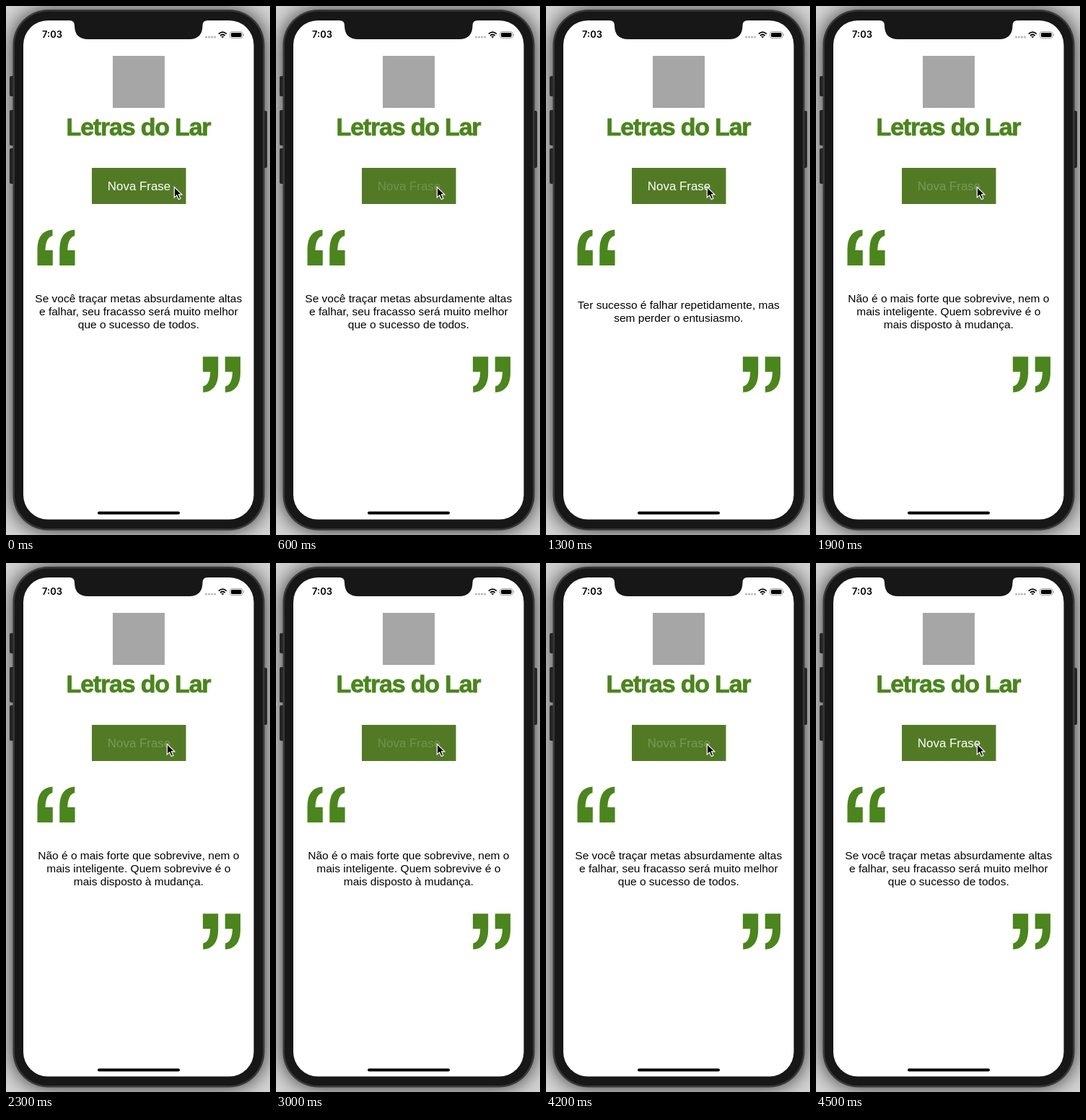
Write an HTML page that moves like this. It is 366 by 732 pixels and loops after 4.7 s.

```html
<!DOCTYPE html>
<html lang="pt">
<head>
<meta charset="utf-8">
<style>
html, body { margin: 0; width: 100%; height: 100%; overflow: hidden; background: #d4d4d4; }
svg { display: block; width: 366px; height: 732px; }
text { font-family: "Liberation Sans", Arial, sans-serif; text-anchor: middle; }
.title { font-size: 34px; font-weight: bold; letter-spacing: -1.2px; fill: #4a861b; stroke: #4a861b; stroke-width: .8px; }
.clock { font: 600 13px Inter, sans-serif; }
#label { font-size: 16.9px; fill: #fff; }
#quote { font-size: 15.5px; }
</style>
</head>
<body>
<svg viewBox="0 0 366 732">
  <defs>
    <filter id="soft" x="-20%" y="-20%" width="140%" height="140%"><feGaussianBlur stdDeviation="14"/></filter>
    <path id="mark" d="M43.5 359V336Q44 311 64.5 309.5V318Q55 320 54.5 338H64.8V359Z"/>
    <g id="marks" fill="#4a861b"><use href="#mark"/><use href="#mark" x="30.8"/></g>
  </defs>

  <rect width="366" height="732" fill="#d4d4d4"/>
  <rect x="10" y="6" width="348" height="719" rx="48" opacity=".8" filter="url(#soft)"/>

  <!-- phone -->
  <g fill="#242424">
    <rect x="5" y="97" width="8" height="28" rx="2"/>
    <rect x="5" y="144" width="8" height="49" rx="2"/>
    <rect x="5" y="197" width="8" height="49" rx="2"/>
    <rect x="354" y="145" width="8" height="79" rx="2"/>
  </g>
  <rect x="9.5" y="5" width="349" height="720.5" rx="49" fill="#383838"/>
  <rect x="12" y="7.5" width="344" height="715.5" rx="46.5" fill="#171717"/>
  <rect x="24" y="20" width="319.5" height="690.5" rx="34" fill="#fff"/>
  <path fill="#171717" d="M88 19V20Q95 20 95 27Q95 46 114 46H253.5Q272.5 46 272.5 27Q272.5 20 279.5 20V19Z"/>
  <rect x="127" y="699.5" width="114" height="4" rx="2"/>

  <!-- status bar -->
  <text class="clock" x="64" y="44.3">7:03</text>
  <g fill="#b5b5b5">
    <circle cx="277.5" cy="43" r="1.5"/><circle cx="281.5" cy="43" r="1.5"/>
    <circle cx="285.5" cy="43" r="1.5"/><circle cx="289.5" cy="43" r="1.5"/>
  </g>
  <g fill="none" stroke="#000" stroke-width="1.7">
    <path d="M294.8 38.7Q300.3 33.7 305.8 38.7M297 41Q300.3 38 303.6 41"/>
    <path d="M298.7 42.3H301.9L300.3 44Z" fill="#000" stroke-width=".6"/>
  </g>
  <rect x="310.5" y="35.5" width="17.5" height="9" rx="2.7" fill="none" stroke="#888" stroke-width=".8"/>
  <rect x="312" y="37" width="14.5" height="6" rx="1.4"/>
  <path d="M329 38.3Q331 40 329 41.7Z" fill="#888"/>

  <!-- app -->
  <rect x="148" y="69" width="72" height="72" fill="#a6a6a6"/>
  <text class="title" x="183.5" y="178.5">Letras do Lar</text>
  <rect x="119" y="224" width="130.5" height="50" fill="#527a25"/>
  <text id="label" x="184.5" y="255">Nova Frase</text>
  <use href="#marks"/>
  <use href="#marks" transform="translate(368.5 844.3) scale(-1)"/>
  <text id="quote"></text>
  <path id="cursor" d="M0 0V14.5L3.4 11.4L6 17L8.6 15.9L6.2 10.4H10.5Z" stroke="#fff" stroke-width="1.2"/>
</svg>
<script>
const LOOP = 4700, STEP = 100;
const quotes = [
  ["Se você traçar metas absurdamente altas", "e falhar, seu fracasso será muito melhor", "que o sucesso de todos."],
  ["Ter sucesso é falhar repetidamente, mas", "sem perder o entusiasmo."],
  ["Não é o mais forte que sobrevive, nem o", "mais inteligente. Quem sobrevive é o", "mais disposto à mudança."]
];
// press time, release time, quote shown on release
const clicks = [[500, 700, 1], [1700, 1900, 2], [2300, 2300, 2], [2900, 3200, 2], [4100, 4200, 0]];
const [label, quote, cursor] = ["label", "quote", "cursor"].map(id => document.getElementById(id));
const clamp = x => Math.min(1, Math.max(0, x));
const smooth = x => x * x * (3 - 2 * x);
let shown = -1;

function showQuote(index) {
  if (index === shown) return;
  shown = index;
  const lines = quotes[index], top = 427.5 - (lines.length - 1) * 9;
  quote.innerHTML = lines.map((line, i) => `<tspan x="183.8" y="${top + i * 18}">${line}</tspan>`).join("");
}

function draw(now) {
  const t = Math.floor(now % LOOP / STEP) * STEP;
  let alpha = 1, index = 0;
  for (const [press, release, next] of clicks) {
    if (t < press) break;
    if (t < release) {
      alpha = t === press ? .32 : .19;
    } else {
      alpha = .19 + .81 * smooth(clamp((t - release + 50) / 350));
      index = next;
    }
  }
  label.setAttribute("fill-opacity", alpha);
  showQuote(index);
  cursor.setAttribute("transform", `translate(${233.3 - 10 * clamp(t / 300)} 250.5)`);
}

const start = performance.now();
function tick() {
  draw(performance.now() - start);
  requestAnimationFrame(tick);
}
tick();
</script>
</body>
</html>
```
